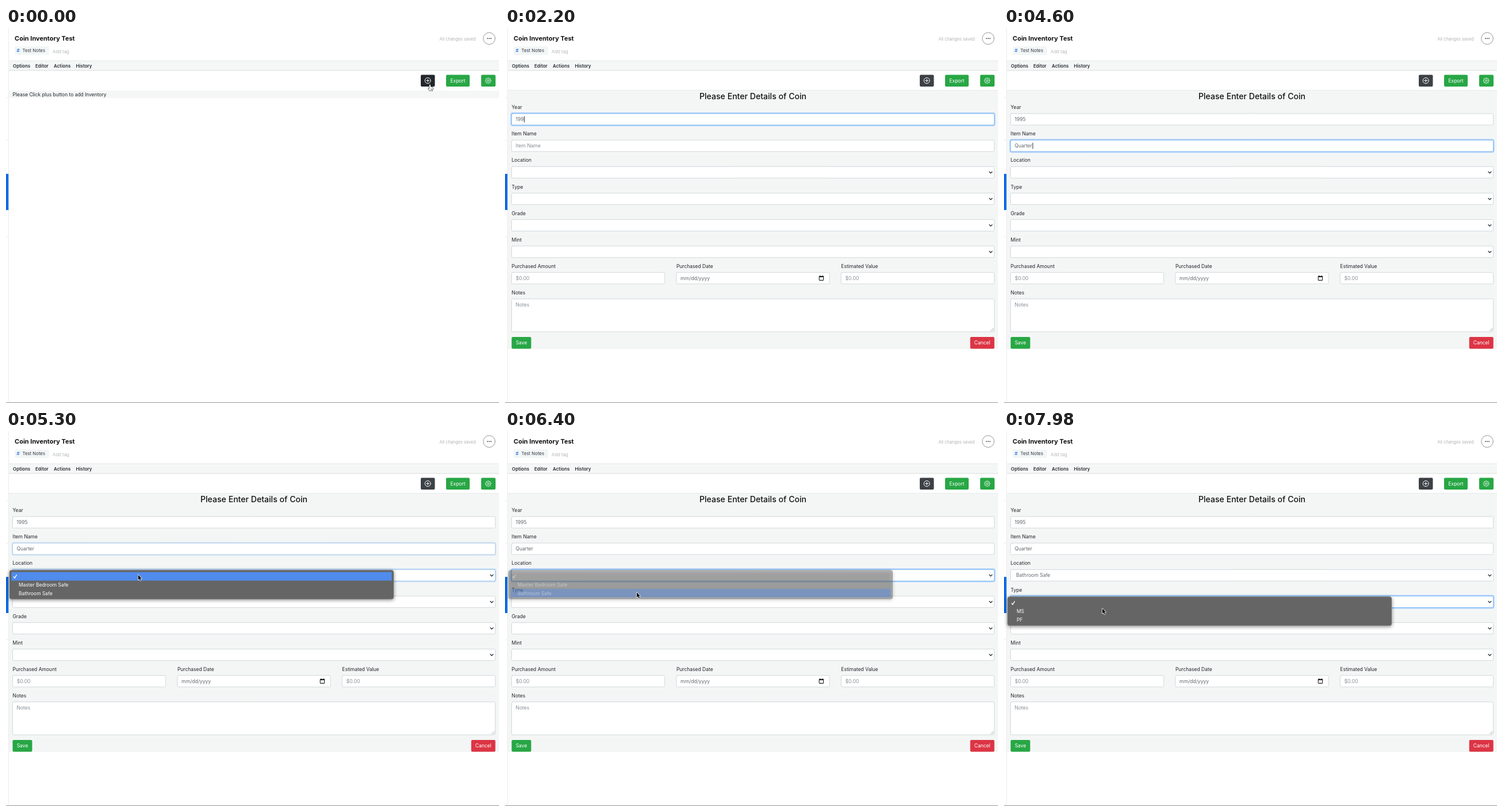
An HTML page with a canvas that plays this animation: 857 by 653 pixels, repeating every 8000 ms.

```html
<!DOCTYPE html>
<html lang="en">
<head>
<meta charset="utf-8">
<title>Coin Inventory</title>
<style>
  html, body { margin: 0; width: 100%; height: 100%; overflow: hidden; background: #fff; }
  canvas { display: block; width: 857px; height: 653px; }
</style>
</head>
<body>
<canvas id="stage"></canvas>
<script>
const W = 857, H = 653, LOOP = 8000;
const canvas = document.getElementById('stage');
const c = canvas.getContext('2d');
const ratio = window.devicePixelRatio || 1;
canvas.width = W * ratio;
canvas.height = H * ratio;

const FONT = 'Inter, Roboto, "Liberation Sans", sans-serif';
const INK = '#212529', MUTED = '#868d94', VALUE = '#62696f', PANEL = '#f4f6f6';
const GREEN = '#28a745', RED = '#dc3545';
const LEFT = 11.5, RIGHT = 850.5, GAP = 46.15;

// Moments at which the screen refreshes
const STEPS = [0, 70, 600, 800, 970, 1100, 1200, 1300, 1400, 1600, 1700, 1800, 1950,
  2100, 2200, 2400, 2700, 2800, 2950, 3100, 3200, 3300, 3400, 3800, 3900, 4100, 4200,
  4300, 4500, 4600, 4800, 4900, 5000, 5100, 5200, 5300, 5500, 5590, 5680, 5780, 5880,
  5970, 6080, 6300, 6400, 6500, 6600, 6700, 6780, 6880, 6980, 7180, 7300, 7500, 7600,
  7700, 7780, 7880, 7980];
const YEAR_KEYS = [1950, 2100, 2200, 2400];
const NAME_KEYS = [3800, 3900, 4100, 4200, 4300, 4500, 4600];

// time, x, y, pointer shape from that time on
const POINTER = [
  [0, 738, 104, 'hand'], [600, 736, 105, 'hand'], [970, 640, 120, 'arrow'],
  [1200, 470, 149, 'beam'], [1300, 437.5, 153, 'beam'], [1950, 437.5, 153, 'none'],
  [2700, 437.5, 153, 'beam'], [3100, 325.5, 213, 'beam'], [3800, 325.5, 213, 'none'],
  [4800, 325.5, 213, 'beam'], [4900, 300, 222, 'arrow'], [5200, 230, 249, 'arrow'],
  [5500, 229, 253, 'arrow'], [5780, 229, 281, 'arrow'], [6600, 229, 281, 'arrow'],
  [6980, 172, 297, 'arrow'], [7300, 172, 298, 'arrow'], [7600, 171, 309, 'arrow'],
  [8000, 171, 309, 'arrow']
];

const ramp = (t, a, b) => Math.min(1, Math.max(0, (t - a) / (b - a)));
const typed = (word, keys, t) => word.slice(0, keys.filter(k => t >= k).length);

function text(s, x, y, size = 8.5, color = INK, weight = 400, align = 'left') {
  c.font = `${weight} ${size}px ${FONT}`;
  c.fillStyle = color;
  c.textAlign = align;
  c.textBaseline = 'alphabetic';
  c.fillText(s, x, y + size * 0.36);
}

function rect(x, y, w, h, color) {
  c.fillStyle = color;
  c.fillRect(x, y, w, h);
}

function round(x, y, w, h, r, fill, stroke, line = 1) {
  c.beginPath();
  c.roundRect(x, y, w, h, r);
  if (fill) { c.fillStyle = fill; c.fill(); }
  if (stroke) { c.strokeStyle = stroke; c.lineWidth = line; c.stroke(); }
}

function poly(points, color, width, fill, close) {
  c.beginPath();
  points.forEach(([x, y], i) => i ? c.lineTo(x, y) : c.moveTo(x, y));
  if (close) c.closePath();
  c.lineJoin = c.lineCap = 'round';
  if (color) { c.strokeStyle = color; c.lineWidth = width; c.stroke(); }
  if (fill) { c.fillStyle = fill; c.fill(); }
}

function circle(x, y, r, stroke, width, fill) {
  c.beginPath();
  c.arc(x, y, r, 0, Math.PI * 2);
  if (fill) { c.fillStyle = fill; c.fill(); }
  if (stroke) { c.strokeStyle = stroke; c.lineWidth = width; c.stroke(); }
}

function at(x, y, draw) {
  c.save();
  c.translate(x, y);
  draw();
  c.restore();
}

function button(x, y, w, label, color) {
  round(x, y, w, 20.5, 2, color);
  if (label) text(label, x + w / 2, y + 10.2, 8.5, '#fff', 400, 'center');
}

function gear(x, y) {
  const pts = [];
  for (let i = 0; i < 32; i++) {
    const a = (i - 0.5) * Math.PI / 16, r = i % 4 < 2 ? 4.9 : 3.9;
    pts.push([x + r * Math.cos(a), y + r * Math.sin(a)]);
  }
  poly(pts, '#fff', 0.9, null, true);
  circle(x, y, 1.7, '#fff', 0.9);
}

function field(x, y, w, h, focus = 0) {
  if (focus) {
    c.globalAlpha = focus;
    round(x - 1, y - 1, w + 2, h + 2, 3, null, 'rgba(0,123,255,.3)', 2);
    c.globalAlpha = 1;
  }
  round(x, y, w, h, 2, '#fff', '#d3d8dc');
  if (focus) {
    c.globalAlpha = focus;
    round(x, y, w, h, 2, null, '#80bdff');
    c.globalAlpha = 1;
  }
}

function input(row, value, hint, focus, caret) {
  const y = 149 + row * GAP, mid = y + 10;
  field(LEFT, y, RIGHT - LEFT, 20, focus);
  text(value || hint, 18.5, mid, 8.5, value ? VALUE : MUTED);
  if (caret) {
    const x = 18.7 + (value ? c.measureText(value).width + 0.4 : 0);
    rect(x, mid - 5.3, 0.9, 10.6, '#111');
  }
}

function select(row, value, focus) {
  const y = 149 + row * GAP, mid = y + 10;
  field(LEFT, y, RIGHT - LEFT, 20, focus);
  if (value) text(value, 21, mid, 8.5, VALUE);
  poly([[842, mid - 1], [844.4, mid + 1.5], [846.8, mid - 1]], '#343a40', 1.4);
}

function menu(row, items, active, alpha) {
  const top = 242.3 + (row - 2) * GAP;
  c.save();
  c.globalAlpha = alpha;
  c.shadowColor = 'rgba(0,0,0,.5)';
  c.shadowBlur = 6 * ratio;
  c.shadowOffsetY = 1.5 * ratio;
  round(6, top, 668, 50.5, 4, '#656565');
  c.shadowColor = 'transparent';
  round(6.5, top + 0.5, 667, 49.5, 4, null, '#777', 0.7);
  if (active >= 0) rect(9.5, top + 3.4 + active * 14.6, 661, 14.8, '#508bee');
  const y = top + 11.2;
  poly([[13.4, y + 0.3], [15.1, y + 2.6], [18.4, y - 2.8]], '#fff', 1.4);
  items.forEach((s, i) => text(s, 22, y + 14.5 * (i + 1), 8.45, '#fff'));
  c.restore();
}

function header(t) {
  rect(0, 0, W, H, '#fff');
  rect(4, 0, 1, H, '#ececec');
  for (const y of [121, 195, 363]) rect(0, y, 4, 1, '#ececec');
  rect(0, 254, 4.3, 63, '#0d6be0');

  text('Coin Inventory Test', 15, 18.3, 11, '#111', 700);
  round(15, 32, 60, 15, 2, '#f3f6f7');
  text('#', 18.6, 39.6, 8, '#3f83e8', 700);
  text('Test Notes', 28.5, 39.6, 7.8, '#333a40');
  text('Add tag', 81, 41.3, 7.8, '#b4b8bb');
  text('All changes saved', 753.5, 19, 7.35, '#b0b3b6');
  circle(840, 18.2, 10.3, '#8c8c8c', 0.9);
  for (const dx of [-3, 0, 3]) circle(840 + dx, 18.2, 0.95, null, 0, '#444');

  rect(5, 57, W, 17, '#f5f7f7');
  rect(5, 56.5, W, 1, '#e6e8e8');
  rect(5, 73.5, W, 1, '#d9dcdc');
  [['Options', 12], ['Editor', 51], ['Actions', 83], ['History', 121.5]]
    .forEach(([s, x]) => text(s, x, 66, 8, '#2b2f33', 600));

  button(721, 81.5, 24.5, '', t < 970 ? '#23272b' : '#3c4146');
  circle(733.2, 91.6, 5, '#fff', 1);
  poly([[730.7, 91.6], [735.7, 91.6]], '#fff', 1);
  poly([[733.2, 89.1], [733.2, 94.1]], '#fff', 1);
  button(765, 81.5, 41, 'Export', GREEN);
  button(826, 81.5, 25, '', GREEN);
  gear(838.2, 91.7);
  rect(0, 652, W, 1, '#949494');
}

function form(t) {
  rect(5, 109, W, 450, PANEL);
  rect(5, 108, W, 1, '#e6e9e9');
  text('Please Enter Details of Coin', 431, 119, 14.1, '#111', 500, 'center');
  ['Year', 'Item Name', 'Location', 'Type', 'Grade', 'Mint']
    .forEach((s, i) => text(s, LEFT, 138 + i * GAP));

  const year = ramp(t, 1300, 1550) * (1 - ramp(t, 3180, 3380));
  const name = ramp(t, 3200, 3370) * (1 - ramp(t, 5180, 5380));
  const place = ramp(t, 5200, 5370) * (1 - ramp(t, 7080, 7280));
  input(0, typed('1995', YEAR_KEYS, t), 'Year', year, t >= 1400 && t < 3200);
  input(1, typed('Quarter', NAME_KEYS, t), 'Item Name', name, t >= 3200 && t < 5200);
  select(2, t >= 6500 ? 'Bathroom Safe' : '', place);
  select(3, '', ramp(t, 7080, 7280));
  select(4, '', 0);
  select(5, '', 0);

  [['Purchased Amount', '$0.00'], ['Purchased Date', 'mm/dd/yyyy'], ['Estimated Value', '$0.00']]
    .forEach(([label, hint], i) => {
      const x = LEFT + i * 286.4;
      text(label, x, 415);
      field(x, 425.7, 266.2, 20);
      text(hint, x + 7.2, 436, 8.6, i === 1 ? VALUE : MUTED);
    });
  round(546.2, 432.4, 7.4, 7, 0.8, null, '#222', 1.1);
  rect(546, 432, 8, 2, '#222');
  rect(547, 431, 1.2, 1.2, '#222');
  rect(551.8, 431, 1.2, 1.2, '#222');

  text('Notes', LEFT, 461.3);
  field(LEFT, 471.7, RIGHT - LEFT, 57.3);
  text('Notes', 18.5, 481.8, 8.5, MUTED);
  poly([[844.5, 527.5], [849, 523]], '#8a8a8a', 0.7);
  poly([[847.2, 527.5], [849, 525.7]], '#8a8a8a', 0.7);
  button(11.5, 538, 34, 'Save', GREEN);
  button(808.7, 538, 42, 'Cancel', RED);

  if (t >= 5300 && t < 6500) {
    const row = t < 5590 ? 0 : t < 5780 ? 1 : 2;
    menu(2, ['Master Bedroom Safe', 'Bathroom Safe'], row, t < 6300 ? 1 : t < 6400 ? 0.9 : 0.42);
  }
  if (t >= 7180) menu(3, ['MS', 'PF'], t < 7500 ? 0 : t < 7980 ? 1 : -1, 1);
}

const shapes = {
  none() {},
  beam() {
    const bar = (color, w) => {
      poly([[0, -4], [0, 4]], color, w);
      poly([[-2, -5], [0, -4], [2, -5]], color, w);
      poly([[-2, 5], [0, 4], [2, 5]], color, w);
    };
    bar('rgba(255,255,255,.8)', 2.2);
    bar('#333', 1);
  },
  arrow() {
    poly([[0, 0], [0, 9], [2, 7.1], [3.5, 10.4], [5, 9.7], [3.6, 6.6], [6.2, 6.4]],
      '#fff', 1.4, '#111', true);
  },
  hand() {
    poly([[-2.2, -5], [-1, -5.6], [-0.2, -4.8], [0.2, -1.4], [3.4, -0.8], [4.2, 0.4],
      [3.8, 3], [3, 5.4], [-1.4, 5.4], [-3.8, 1.8], [-3.6, 0.6], [-1.6, 1.4]],
      '#222', 1.2, '#fff', true);
    for (const x of [0.2, 1.6, 2.8]) poly([[x, 2], [x, 4]], '#555', 0.6);
  }
};

function pointer(t) {
  let i = 0;
  while (i < POINTER.length - 2 && t >= POINTER[i + 1][0]) i++;
  const [t0, x0, y0, kind] = POINTER[i], [t1, x1, y1] = POINTER[i + 1];
  const k = ramp(t, t0, t1);
  at(x0 + (x1 - x0) * k, y0 + (y1 - y0) * k, shapes[kind]);
}

function draw(now) {
  const time = now % LOOP;
  const t = STEPS.filter(s => s <= time).pop();
  c.setTransform(ratio, 0, 0, ratio, 0, 0);
  header(t);
  if (t < 70) {
    rect(5, 109, W, 13, '#f5f7f7');
    text('Please Click plus button to add Inventory', LEFT, 116, 8.45);
  } else {
    form(t);
  }
  pointer(t);
}

const start = performance.now();
function tick() {
  draw(performance.now() - start);
  requestAnimationFrame(tick);
}
tick();
</script>
</body>
</html>
```
